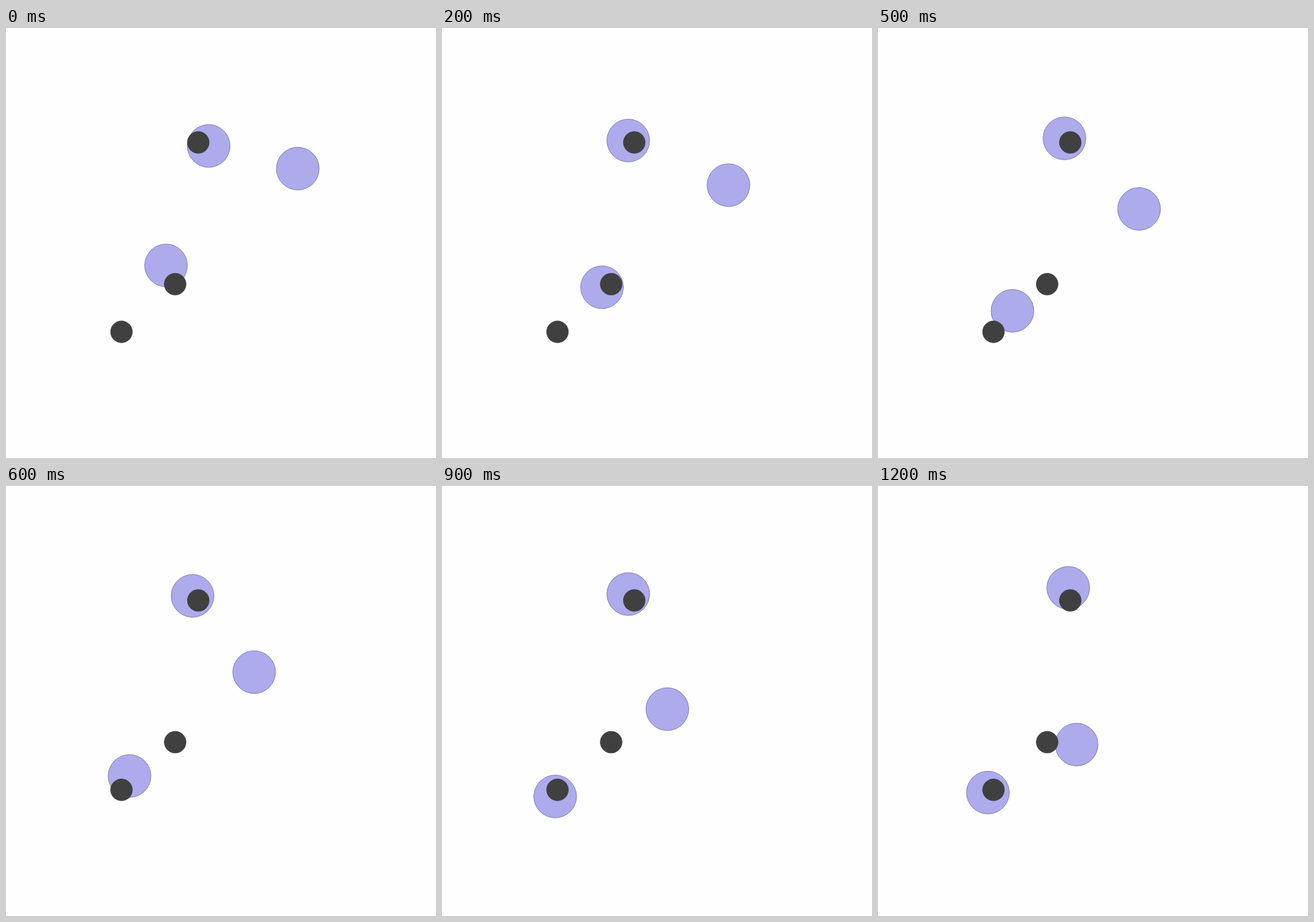
Animation, 700 px wide and 700 px high, one loop 1300 ms. Source, as an HTML page without scripts:

```html
<!DOCTYPE html>
<html lang="en">
<head>
<meta charset="utf-8">
<title>Drifting discs</title>
<style>
  html, body { margin: 0; width: 100%; height: 100%; overflow: hidden; background: #fefefe; }
  svg { display: block; width: 100vw; height: 100vh; }
  .dot { fill: #404040; stroke: #343434; stroke-width: .6; }
  .disc {
    fill: #adabeb; stroke: #7573b4; stroke-width: .9;
    animation: drift 1.3s infinite;
  }

  /* Each disc wanders in straight legs, one hop per 100 ms */
  @keyframes drift {
    0%       { translate: var(--a); animation-timing-function: steps(2); }
    15.384%  { translate: var(--b); animation-timing-function: steps(2); }
    30.769%  { translate: var(--c); animation-timing-function: steps(2); }
    46.153%  { translate: var(--d); animation-timing-function: steps(1); }
    53.846%  { translate: var(--e); animation-timing-function: steps(3); }
    76.923%  { translate: var(--f); animation-timing-function: steps(2); }
    92.307%, 100% { translate: var(--g); }
  }
  .right {
    --a: 475px 228.9px; --b: 466.3px 255.8px; --c: 446px 286px; --d: 404px 303px;
    --e: 386.7px 317.2px; --f: 356.9px 386.3px; --g: 323.3px 420.9px;
  }
  .left {
    --a: 260.5px 386.5px; --b: 260.5px 422px; --c: 236.6px 448.7px; --d: 201.1px 472.1px;
    --e: 189.7px 492.4px; --f: 181.5px 511.9px; --g: 178.9px 499.1px;
  }
  .top {
    --a: 329.9px 192px; --b: 303.2px 183.2px; --c: 303.4px 180.5px; --d: 303.7px 178.8px;
    --e: 312.4px 182.2px; --f: 298.7px 172.7px; --g: 309.7px 165.8px;
  }
</style>
</head>
<body>
<svg viewBox="0 0 700 700">
  <circle class="disc right" r="34.8"/>
  <circle class="disc left" r="34.8"/>
  <circle class="disc top" r="34.8"/>

  <circle class="dot" cx="313" cy="186.3" r="17.8"/>
  <circle class="dot" cx="275.4" cy="417" r="17.8"/>
  <circle class="dot" cx="188" cy="494.6" r="17.8"/>
</svg>
</body>
</html>
```
